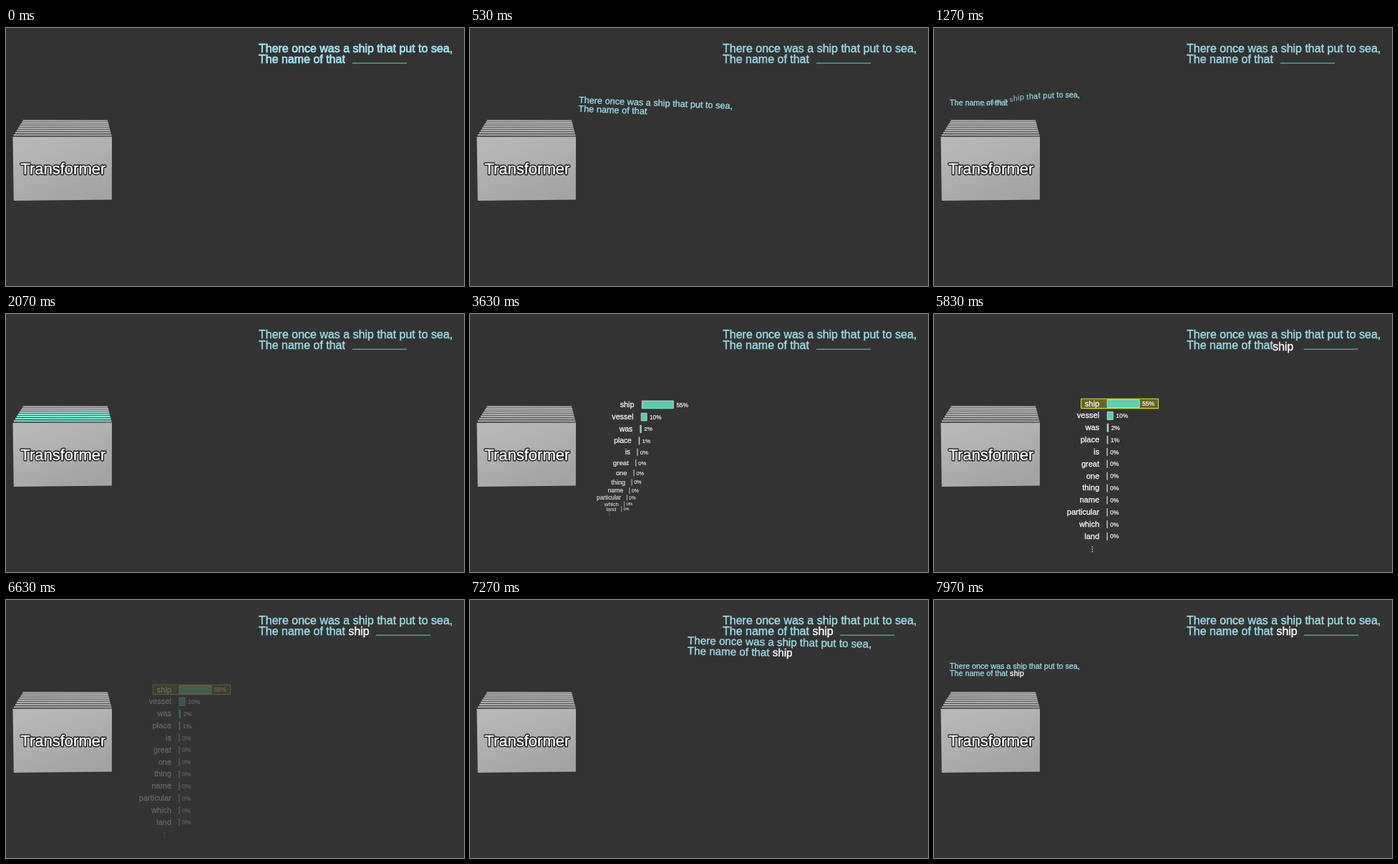
An HTML page with a canvas for the animation above (8 s loop, 640x360 px).

```html
<!DOCTYPE html>
<html lang="en">
<head>
<meta charset="utf-8">
<title>Predicting the next word</title>
<style>
html, body { margin: 0; width: 100%; height: 100%; overflow: hidden; background: #333; }
canvas { display: block; width: 100vw; height: 100vh; }
</style>
</head>
<body>
<canvas id="stage"></canvas>
<script>
const canvas = document.getElementById('stage');
const ctx = canvas.getContext('2d');
const dpr = window.devicePixelRatio || 1;
canvas.width = 640 * dpr;
canvas.height = 360 * dpr;

const LOOP = 8000, RUN = 1000, FPS = 30;
const BLUE = '#9cdfec', TEAL = '#5cd0b3', WHITE = '#fff';
const FAMILY = '"Liberation Sans", Arial, sans-serif';
const LINES = ['There once was a ship that put to sea,', 'The name of that'];
const TEXT = { x: 353, y: 34.1, size: 16, leading: 15.3 };
const SMALL = 0.67, SMALL_X = 22;
const ROWS = [['ship', 55], ['vessel', 10], ['was', 2], ['place', 1], ['is', 0], ['great', 0],
  ['one', 0], ['thing', 0], ['name', 0], ['particular', 0], ['which', 0], ['land', 0]];
const BAR_X = 242, LABEL_X = 231, ROW_Y = 125, ROW_GAP = 16.84;
const SOURCE = { x: 151, y: 196 };
const SINK = { x: 79, y: 133 };

const clamp = v => Math.min(1, Math.max(0, v));
const mix = (a, b, p) => a + (b - a) * p;
const smooth = v => { const t = clamp(v); return t * t * t * (10 - 15 * t + 6 * t * t); };
const ease = (now, start) => smooth((now - start) / RUN);
const thereAndBack = t => smooth(t < 0.5 ? 2 * t : 2 - 2 * t);
// Local time of item i of n when starts are staggered by a share of one item's run.
const lagged = (now, start, i, n, lag) => clamp((now - start) / RUN * (1 + (n - 1) * lag) - i * lag);
const font = size => { ctx.font = `${size}px ${FAMILY}`; };

// A hairline stroke gives the letters slightly heavier stems.
function label(str, x, y, size, color, align = 'left') {
  font(size);
  ctx.textAlign = align;
  ctx.fillStyle = ctx.strokeStyle = color;
  ctx.lineWidth = size * 0.024;
  ctx.fillText(str, x, y);
  ctx.strokeText(str, x, y);
}

function scoped(draw) {
  ctx.save();
  draw();
  ctx.restore();
}

function segment(x1, y1, x2, y2, color, width) {
  ctx.strokeStyle = color;
  ctx.lineWidth = width;
  ctx.beginPath();
  ctx.moveTo(x1, y1);
  ctx.lineTo(x2, y2);
  ctx.stroke();
}

function quad(points, fill) {
  ctx.fillStyle = fill;
  ctx.beginPath();
  points.forEach(([x, y]) => ctx.lineTo(x, y));
  ctx.closePath();
  ctx.fill();
}

function shipOffset() {
  font(TEXT.size);
  return ctx.measureText(LINES[1] + ' ').width;
}

function verse(withShip) {
  LINES.forEach((line, i) => label(line, 0, i * TEXT.leading, TEXT.size, BLUE));
  if (withShip) label('ship', shipOffset(), TEXT.leading, TEXT.size, WHITE);
}

function drawHeading(now) {
  scoped(() => {
    ctx.translate(TEXT.x, TEXT.y);
    verse(false);
  });
  const p = ease(now, 4967);
  const shift = 33.3 * p;
  segment(484 + shift, 49.1, 560 + shift, 49.1, '#55b8a0', 1.2);
  if (now >= 4967) {
    label('ship', mix(LABEL_X - 20.2, TEXT.x + shipOffset(), p),
      mix(ROW_Y + 3.6, TEXT.y + TEXT.leading, p), mix(11, TEXT.size, p), WHITE);
  }
}

// Every point follows its own 45 degree arc: a complex progress applied to its displacement.
function drawFlyingVerse(now, start, restY, withShip) {
  const arc = Math.PI / 4, p = ease(now, start);
  const length = Math.sin(p * arc / 2) / Math.sin(arc / 2);
  const turn = (p - 1) * arc / 2;
  const re = length * Math.cos(turn), im = length * Math.sin(turn);
  const dx = SMALL_X - TEXT.x, dy = restY - TEXT.y;
  const a = 1 - re * (1 - SMALL), b = -im * (1 - SMALL);
  scoped(() => {
    ctx.transform(a, b, -b, a, TEXT.x + re * dx - im * dy, TEXT.y + re * dy + im * dx);
    verse(withShip);
  });
}

function drawSinkingVerse(now, start, restY) {
  const count = LINES.join('').replace(/ /g, '').length;
  let index = 0;
  LINES.forEach((line, row) => {
    [...line].forEach((char, k) => {
      if (char === ' ') return;
      const p = smooth(lagged(now, start, index++, count, 0.02));
      const alpha = 1 - 2.3 * p;
      if (alpha <= 0) return;
      font(TEXT.size);
      const offset = ctx.measureText(line.slice(0, k + 1)).width - ctx.measureText(char).width;
      const x = SMALL_X + offset * SMALL, y = restY + row * TEXT.leading * SMALL;
      scoped(() => {
        ctx.globalAlpha = alpha;
        ctx.translate(mix(x, SINK.x, p), mix(y, SINK.y, p));
        ctx.scale(SMALL * (1 - 0.5 * p), SMALL * (1 - 0.5 * p));
        label(char, 0, 0, TEXT.size, BLUE);
      });
    });
  });
}

function drawBlock(now) {
  const layers = 8;
  quad([[24, 128.3], [142, 129], [148, 152], [9.5, 152]], '#484848');
  for (let i = 0; i < layers; i++) {
    const f = i / (layers - 1);
    const g = 0.03 + 0.87 * (0.85 * f + 0.15 * f * f);
    const y = 128.5 + 23 * g;
    const glow = thereAndBack(lagged(now, 1467, i, layers, 0.09));
    const color = `rgb(${mix(172, 125, glow)},${mix(172, 238, glow)},${mix(172, 210, glow)})`;
    segment(24 - 14.5 * g, y, 142 + 6 * g, y + 0.3, color, 2.1);
  }
  segment(9.5, 151.3, 148, 151.3, '#444', 0.9);
  const shade = ctx.createLinearGradient(50, 150, 85, 245);
  shade.addColorStop(0, '#b8b8b8');
  shade.addColorStop(1, '#a4a4a4');
  quad([[9.5, 152], [148, 151.7], [147.8, 239.5], [10.8, 241]], shade);

  font(22);
  ctx.textAlign = 'center';
  ctx.lineJoin = 'round';
  ctx.strokeStyle = '#000';
  ctx.lineWidth = 2.8;
  ctx.strokeText('Transformer', 79.8, 203.6);
  label('Transformer', 79.8, 203.6, 22, WHITE, 'center');
}

function drawRow([word, percent], y) {
  const width = percent * 0.82;
  label(word, LABEL_X, y + 3.6, 11, WHITE, 'right');
  ctx.fillStyle = TEAL;
  ctx.fillRect(BAR_X, y - 5.4, width, 11);
  ctx.strokeStyle = '#e8f4f0';
  ctx.lineWidth = 0.7;
  ctx.strokeRect(BAR_X, y - 5.4, width, 11);
  label(percent + '%', BAR_X + width + 4, y + 3.2, 8.5, WHITE);
}

function drawDots() {
  ctx.fillStyle = WHITE;
  for (const y of [325, 328.3, 331.6]) {
    ctx.beginPath();
    ctx.arc(221.3, y, 0.8, 0, 2 * Math.PI);
    ctx.fill();
  }
}

function drawChart(now) {
  if (now < 2967 || now >= 6967) return;
  const fade = 1 - ease(now, 5967);
  scoped(() => {
    ctx.globalAlpha = fade * ease(now, 3967);
    ctx.fillStyle = 'rgba(255,255,0,.25)';
    ctx.fillRect(205.5, 118.2, 108, 13.4);
    ctx.strokeStyle = '#e0d832';
    ctx.lineWidth = 1.1;
    ctx.strokeRect(205.5, 118.2, 108, 13.4);
  });
  for (let i = 0; i <= ROWS.length; i++) {
    const p = smooth(lagged(now, 2967, i, ROWS.length + 1, 0.025));
    if (p === 0) continue;
    scoped(() => {
      ctx.globalAlpha = p * fade;
      ctx.translate(SOURCE.x, SOURCE.y);
      ctx.scale(p, p);
      ctx.translate(-SOURCE.x, -SOURCE.y);
      if (i < ROWS.length) drawRow(ROWS[i], ROW_Y + i * ROW_GAP);
      else drawDots();
    });
  }
}

function draw(now) {
  ctx.setTransform(dpr, 0, 0, dpr, 0, 0);
  ctx.fillStyle = '#333';
  ctx.fillRect(0, 0, 640, 360);
  drawBlock(now);
  drawChart(now);
  drawHeading(now);
  if (now < 967) drawFlyingVerse(now, -33, 97.3, false);
  else if (now < 1967) drawSinkingVerse(now, 967, 97.3);
  else if (now >= 6967) drawFlyingVerse(now, 6967, 95.5, true);
}

// The picture advances in steps of one film frame, shown up to 4 ms early.
const start = performance.now();
function tick() {
  const elapsed = (performance.now() - start) % LOOP;
  draw(Math.floor((elapsed + 4) * FPS / 1000) * 1000 / FPS);
  requestAnimationFrame(tick);
}
tick();
</script>
</body>
</html>
```
